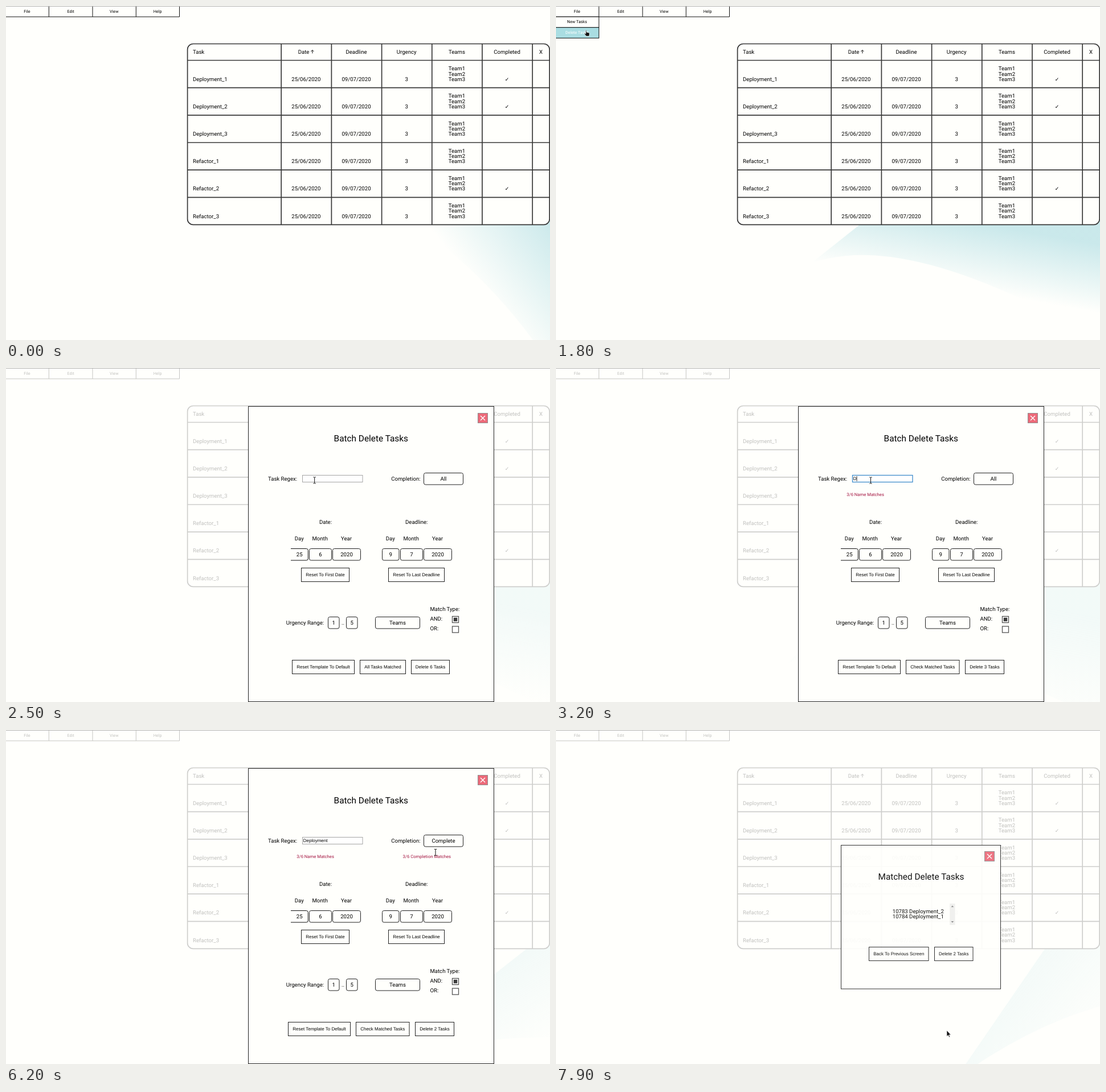
Animation, 955 px wide and 587 px high, one loop 8 s. Source, as an HTML page:

```html
<!DOCTYPE html>
<html lang="en">
<head>
<meta charset="utf-8">
<title>Batch delete tasks</title>
<style>
  html, body { margin: 0; width: 100%; height: 100%; overflow: hidden; background: #fffffc; }
  svg { display: block; width: 955px; height: 587px; }
  text { font: 9.6px Roboto, sans-serif; fill: #000; text-rendering: geometricPrecision; white-space: pre; }
  .mid { text-anchor: middle; }
  .menu { font-size: 7.2px; }
  .title { font-size: 15.36px; }
  .note { font-size: 7.68px; fill: #a3123f; }
  .btn { font: 8px "Liberation Sans", Arial, sans-serif; }
  .tick { font: 9px "DejaVu Sans", sans-serif; }
  .grid { fill: none; stroke: #383838; stroke-width: 1.7; }
  .line { fill: none; stroke: #111; stroke-width: 1; }
  .box { fill: #fffffc; stroke: #222; stroke-width: 1; }
</style>
</head>
<body>
<script>
const NS = "http://www.w3.org/2000/svg";
const PAPER = "#fffffc", TEAL = "#a9dde2";
const LOOP = 8000, STEP = 100;

function el(parent, tag, attrs = {}, str) {
  const node = document.createElementNS(NS, tag);
  for (const k in attrs) node.setAttribute(k, attrs[k]);
  if (str !== undefined) node.textContent = str;
  return parent.appendChild(node);
}
const group = p => el(p, "g");
const path = (p, d, cls = "line") => el(p, "path", { d, class: cls });
const text = (p, x, y, str, cls = "") => el(p, "text", { x, y, class: cls }, str);
const mid = (p, x, y, str, cls = "") => text(p, x, y, str, "mid " + cls);
const rect = (p, x, y, width, height, more = { class: "box" }) =>
  el(p, "rect", { x, y, width, height, ...more });
const show = (node, on) => node.setAttribute("visibility", on ? "inherit" : "hidden");

function button(p, x, y, w, label) {
  rect(p, x, y, w, 24);
  return mid(p, x + w / 2, y + 14.5, label, "btn");
}
function picker(p, x, y, w, label) {
  rect(p, x, y, w, 20.5, { class: "box", rx: 3 });
  return mid(p, x + w / 2, y + 13.3, label);
}
function closeBox(p, x, y) {
  rect(p, x, y, 17, 17, { fill: "#ec6a79", stroke: "#8f8f8f" });
  el(p, "path", { d: `M${x + 4.5} ${y + 4.5}l8 8m0-8l-8 8`, stroke: "#fff", "stroke-width": 1.4 });
}

const svg = el(document.body, "svg", { viewBox: "0 0 955 587", width: 955, height: 587 });
rect(svg, 0, 0, 955, 587, { fill: PAPER });

// Page: swoosh, menu and table
const page = group(svg);
const grad = el(el(page, "defs"), "linearGradient", { id: "tint", gradientUnits: "userSpaceOnUse" });
el(grad, "stop", { offset: 0, "stop-color": "#c4e6e9", "stop-opacity": 0 });
el(grad, "stop", { offset: 1, "stop-color": "#c4e6e9", "stop-opacity": 0.9 });
const blade = el(page, "path", { fill: "url(#tint)" });

const fileBox = rect(page, 0, 0, 75, 19, { fill: TEAL });
path(page, "M0 19H304.5V0M75.3 0V19M152 0V19M228.3 0V19");
const fileText = mid(page, 37, 12, "File", "menu");
["Edit", "View", "Help"].forEach((s, i) => mid(page, 113.5 + i * 76.3, 12, s, "menu"));

const drop = group(page);
const items = ["New Tasks", "Delete Tasks"].map((s, i) => ({
  box: rect(drop, -1, 19 + i * 18.7, 76.3, 18.7, { class: "line" }),
  label: mid(drop, 37, 30.2 + i * 18.7, s, "menu")
}));

const ROW = 48.17, cols = [483.2, 571.4, 659.6, 747.8, 836, 924.2];
rect(page, 318.6, 66.5, 635.6, 317.9, { fill: PAPER, stroke: "#383838", "stroke-width": 1.7, rx: 10 });
cols.forEach(x => path(page, `M${x} 66.5V384.4`, "grid"));
text(page, 328, 83.6, "Task");
text(page, 512.7, 83.6, "Date");
path(page, "M537.9 83.3V77.5M535.4 80L537.9 77.5L540.4 80");
["Deadline", "Urgency", "Teams", "Completed"].forEach((s, i) => mid(page, 615 + i * 88.2, 83.6, s));
mid(page, 939, 83.6, "X");
for (let i = 0; i < 6; i++) {
  const y = 131.8 + i * ROW;
  path(page, `M318.6 ${95.5 + i * ROW}H954.2`, "grid");
  text(page, 328, y, (i < 3 ? "Deployment_" : "Refactor_") + (i % 3 + 1));
  mid(page, 526.8, y, "25/06/2020");
  mid(page, 615, y, "09/07/2020");
  mid(page, 703.2, y, "3");
  for (let k = 0; k < 3; k++) mid(page, 791.4, y - 18.6 + k * 9.3, "Team" + (k + 1));
  if ([0, 1, 4].includes(i)) mid(page, 879.6, y, "✓", "tick");
}
rect(svg, 0, 0, 955, 1, { fill: "#b4b4b4" });

// Batch dialog
const batch = group(svg);
rect(batch, 425.5, 67.5, 431, 519);
closeBox(batch, 828.5, 79.5);
mid(batch, 640.8, 129, "Batch Delete Tasks", "title");
text(batch, 460, 197.8, "Task Regex:");
const field = rect(batch, 520.5, 188.5, 105.5, 12, { fill: "#fff" });
const typed = text(batch, 521.8, 197, "", "btn");
const caret = el(batch, "path", { stroke: "#000", "stroke-width": 0.8 });
text(batch, 676.2, 197.8, "Completion:");
const choice = picker(batch, 733.5, 184.5, 69, "All");
const nameNote = mid(batch, 543, 225, "3/6 Name Matches", "note");
const doneNote = mid(batch, 738.8, 225, "3/6 Completion Matches", "note");

[["Date:", 561, 0, ["25", "6"]], ["Deadline:", 720.7, 160, ["9", "7"]]].forEach(([s, x, dx, val]) => {
  mid(batch, x, 274.4, s);
  mid(batch, 514.7 + dx, 302.7, "Day");
  mid(batch, 551.2 + dx, 302.7, "Month");
  mid(batch, 597.6 + dx, 302.7, "Year");
  if (dx) picker(batch, 660.5, 317.5, 29.5, val[0]);
  else {
    path(batch, "M500 317.5H527.3Q530.3 317.5 530.3 320.5V335Q530.3 338 527.3 338H500");
    mid(batch, 515.2, 330.8, val[0]);
  }
  picker(batch, 532.5 + dx, 317.5, 39, val[1]);
  picker(batch, 573.5 + dx, 317.5, 49, "2020");
});
button(batch, 518.5, 351.5, 84, "Reset To First Date");
button(batch, 671.5, 351.5, 98, "Reset To Last Deadline");

text(batch, 491.8, 450.8, "Urgency Range:");
picker(batch, 565.5, 437.5, 19.5, "1");
text(batch, 589, 450.8, "..");
picker(batch, 597.5, 437.5, 19.5, "5");
picker(batch, 648.5, 437.5, 78, "Teams");
["Match Type:", "AND:", "OR:"].forEach((s, i) => text(batch, 744.4, 426.8 + i * 17.2, s));
[436.5, 454].forEach(y => rect(batch, 783.5, y, 11, 11, { fill: "#fff", stroke: "#555", "stroke-width": 1.3 }));
rect(batch, 785.8, 438.8, 6.4, 6.4, { fill: "#3c3c3c" });

const before = group(batch), after = group(batch);
button(before, 502.5, 513.5, 109, "Reset Template To Default");
button(before, 621.5, 513.5, 80, "All Tasks Matched");
button(before, 711.5, 513.5, 67, "Delete 6 Tasks");
button(after, 495.5, 513.5, 109, "Reset Template To Default");
button(after, 614.5, 513.5, 93.5, "Check Matched Tasks");
const del = button(after, 718.5, 513.5, 68, "");

// Matched dialog
const matched = group(svg);
rect(matched, 500.5, 201.7, 280, 252.5);
closeBox(matched, 752.5, 212.7);
mid(matched, 641, 262.5, "Matched Delete Tasks", "title");
mid(matched, 635.8, 320.8, "10783 Deployment_2");
mid(matched, 635.8, 330.2, "10784 Deployment_1");
rect(matched, 691.2, 304.3, 9.3, 37.5, { fill: "#efefed" });
el(matched, "path", { d: "M693.6 310.4h4.6l-2.3-2.7zM693.6 335.2h4.6l-2.3 2.7z", fill: "#888" });
button(matched, 549.5, 380.7, 104.5, "Back To Previous Screen");
button(matched, 664.5, 380.7, 67.5, "Delete 2 Tasks");

// Pointer shapes, hot spot at 0,0
const pointer = group(svg);
const shapes = {
  arrow: "M0 0V10.5L2.5 8.3L4.1 12L5.6 11.3L4 7.8H7.2Z",
  hand: "M-.8 0Q0-.8.7 0V3L4.8 4Q6 4.4 5.8 6L5.2 10H0L-3 6Q-3.6 4.8-2.4 4.8L-.8 6Z",
  beam: "M-2.2-5.5H-.6L0-5L.6-5.5H2.2M0-5V5M-2.2 5.5H-.6L0 5L.6 5.5H2.2"
};
const marks = {};
for (const k in shapes) {
  marks[k] = el(pointer, "path", k === "beam"
    ? { d: shapes[k], fill: "none", stroke: "#111" }
    : { d: shapes[k], fill: "#111", stroke: "#fff", "stroke-width": 0.6 });
}

// Rows are time followed by values
const moves = [
  [300, 9, 94], [500, 41, 67], [600, 41, 67], [700, 40, 26], [800, 38, 10], [900, 38, 10],
  [1200, 42, 27], [1600, 52, 39.5], [1800, 53, 43], [2100, 520, 197], [2700, 552.5, 197.5],
  [4800, 552.5, 197.5], [4900, 555, 197.5], [5300, 898, 372], [5700, 765, 197], [6100, 765, 197],
  [6200, 754, 215], [6300, 819, 359], [6400, 819, 359], [6800, 780, 544], [6900, 780, 544], [7000, 686, 528]
];
const looks = [[0, "arrow"], [700, "hand"], [1900, "arrow"], [2100, "beam"], [5000, "arrow"],
  [5600, "hand"], [6200, "beam"], [6300, "arrow"]];
const typing = [[0, ""], [3200, "D"], [3300, "De"], [3500, "Dep"], [3700, "Depl"], [3800, "Deplo"],
  [3900, "Deploy"], [4000, "Deploym"], [4100, "Deployme"], [4200, "Deploymen"], [4300, "Deployment"]];
const fades = {
  page: [[1800, 1], [2100, 0.24]],
  batch: [[1800, 0], [2000, 0.57], [2100, 0.79], [2300, 1], [6900, 1], [7300, 0]],
  matched: [[7500, 0], [7700, 0.6], [7900, 0.92]]
};
// tip, upper end, curve control, lower end, gradient start and end
const start = [560, 300, 700, 200, 780, 390, 925, 587, 815, 480, 955, 370];
const sweep = [
  [900, ...start],
  [1600, 453, 443, 640, 300, 620, 385, 955, 583, 700, 480, 718, 375],
  [3200, 405, 520, 600, 330, 580, 430, 960, 620, 720, 600, 760, 400],
  [4900, 400, 540, 640, 330, 600, 480, 960, 610, 740, 600, 770, 400],
  [6200, 640, 600, 930, 372, 760, 540, 960, 540, 900, 590, 810, 440],
  [7900, 700, 615, 875, 360, 830, 520, 960, 484, 950, 560, 790, 430]
];

const last = (rows, t) => rows.filter(r => r[0] <= t).pop()[1];
function at(rows, t) {
  const i = rows.findIndex(r => r[0] > t);
  if (i < 0) return rows[rows.length - 1].slice(1);
  if (i === 0) return rows[0].slice(1);
  const a = rows[i - 1], b = rows[i], k = (t - a[0]) / (b[0] - a[0]);
  return a.slice(1).map((v, j) => v + (b[j + 1] - v) * k);
}
function paint(box, label, on) {
  box.style.fill = on ? TEAL : PAPER;
  label.style.fill = on ? "#fff" : "#000";
}
function dialog(node, rows, t) {
  const [o] = at(rows, t);
  show(node, o > 0);
  node.setAttribute("opacity", o);
  node.setAttribute("transform", `translate(0 ${(1 - o) * 10})`);
}

function draw(t) {
  page.setAttribute("opacity", at(fades.page, t)[0]);
  const [tx, ty, ux, uy, cx, cy, lx, ly, x1, y1, x2, y2] = at(sweep, t);
  blade.setAttribute("d", `M${tx} ${ty}Q${cx} ${cy} ${lx} ${ly}L1000 640V200L${ux} ${uy}Z`);
  Object.entries({ x1, y1, x2, y2 }).forEach(([k, v]) => grad.setAttribute(k, v));

  const open = t >= 700 && t < 1900;
  show(drop, open);
  const hover = !open ? -1 : t < 1100 ? 0 : t < 1400 ? 1 : 2;
  paint(fileBox, fileText, hover === 0);
  items.forEach((m, i) => paint(m.box, m.label, hover === i + 1));

  dialog(batch, fades.batch, t);
  dialog(matched, fades.matched, t);

  const focus = t >= 2700 && t < 5300;
  field.setAttribute("stroke", focus ? "#3f8ccb" : "#a5a5a5");
  field.setAttribute("stroke-width", focus ? 1.3 : 1);
  typed.textContent = last(typing, t);
  show(caret, t >= 2700 && t < 4300);
  const end = 522.3 + (typed.textContent ? typed.getComputedTextLength() : 0);
  caret.setAttribute("d", `M${end} 190V199`);

  const filtered = t >= 3200, chosen = t >= 5800;
  show(nameNote, filtered);
  show(before, !filtered);
  show(after, filtered);
  show(doneNote, chosen);
  choice.textContent = chosen ? "Complete" : "All";
  del.textContent = `Delete ${chosen ? 2 : 3} Tasks`;

  show(pointer, t >= 300);
  const [px, py] = at(moves, t), look = last(looks, t);
  pointer.setAttribute("transform", `translate(${px} ${py})`);
  for (const k in marks) show(marks[k], k === look);
}

const origin = performance.now();
function tick() {
  const t = (performance.now() - origin) % LOOP;
  draw(Math.floor(t / STEP) * STEP);
  requestAnimationFrame(tick);
}
tick();
</script>
</body>
</html>
```
